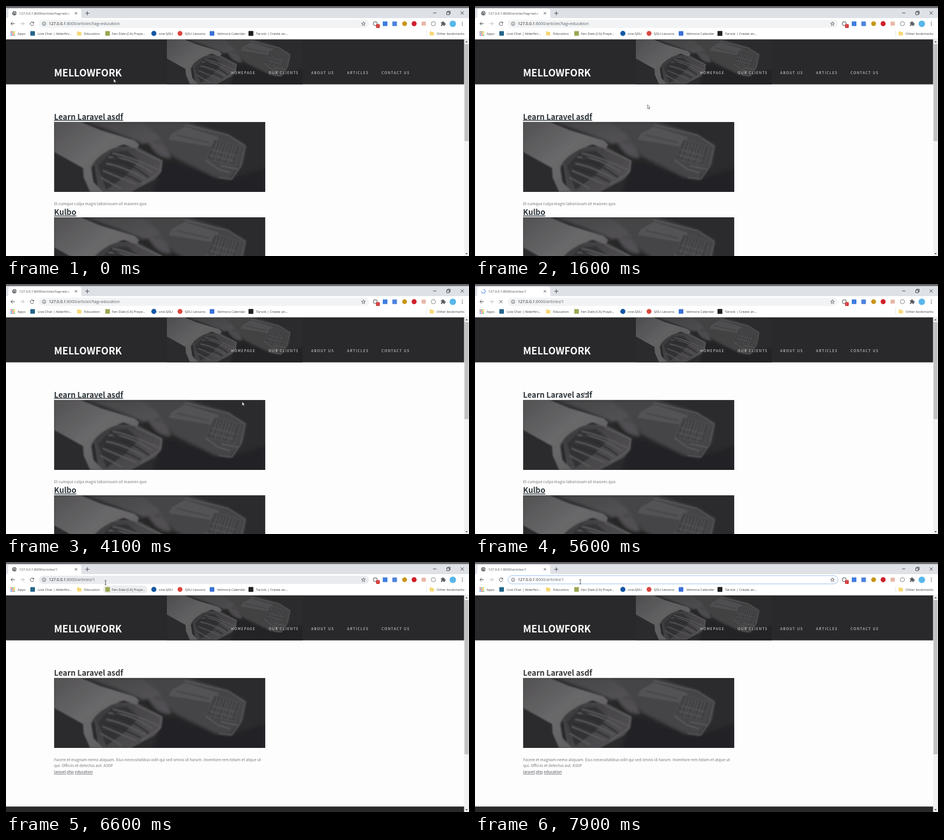
An HTML page that plays this animation: 800x433 px, repeating every 8000 ms.

```html
<!DOCTYPE html>
<html lang="en">
<head>
<meta charset="utf-8">
<title>Articles</title>
<style>
html, body { margin: 0; width: 100%; height: 100%; overflow: hidden; background: #fefdfe; }
svg { display: block; width: 800px; height: 433px; }
.ui { font-family: "Open Sans", "Noto Sans", sans-serif; font-size: 5.87px; fill: #3c4043; }
.page { font-family: "Noto Sans CJK JP", "Noto Sans CJK SC", "Noto Sans CJK", "Noto Sans", sans-serif; }
.title { font-size: 5.75px; fill: #45494d; }
.url { font-size: 6.98px; fill: #5f6368; }
.logo { font-size: 16.8px; font-weight: 700; fill: #fff; }
.nav { font-size: 5.97px; letter-spacing: 1.33px; fill: #e9e9e9; font-weight: 300; }
.head { font-size: 13.3px; font-weight: 600; fill: #2b3439; }
.copy { font-size: 6.69px; font-weight: 300; fill: #777; }
.tags { font-size: 6.62px; fill: #4c5257; }
.under { text-decoration: underline; }
.line { fill: none; stroke: #50545a; stroke-width: 1; }
</style>
</head>
<body>
<svg viewBox="0 0 800 433" xmlns="http://www.w3.org/2000/svg">
<defs>
  <linearGradient id="boot" x1="0" y1="0" x2="1" y2="1">
    <stop offset="0" stop-color="#525153"/><stop offset=".45" stop-color="#69686a"/><stop offset="1" stop-color="#5e5d5f"/>
  </linearGradient>
  <linearGradient id="far" x1="0" y1="0" x2="1" y2="1">
    <stop offset="0" stop-color="#434244"/><stop offset=".6" stop-color="#525153"/><stop offset="1" stop-color="#3b3a3c"/>
  </linearGradient>
  <linearGradient id="glass" x1="0" y1="0" x2="1" y2=".6">
    <stop offset="0" stop-color="#3a393b"/><stop offset="1" stop-color="#514f52"/>
  </linearGradient>
  <linearGradient id="fade" gradientUnits="userSpaceOnUse" x1="102" x2="116">
    <stop offset="0" stop-color="#fff" stop-opacity="0"/><stop offset="1" stop-color="#fff"/>
  </linearGradient>
  <filter id="soft" x="-20%" y="-20%" width="140%" height="140%"><feGaussianBlur stdDeviation="2.4"/></filter>
  <filter id="fine"><feGaussianBlur stdDeviation=".9"/></filter>
  <clipPath id="crop"><rect width="364.8" height="121.3"/></clipPath>
  <g id="photo" clip-path="url(#crop)">
    <rect width="365" height="122" fill="#2b2a2c"/>
    <g filter="url(#soft)">
      <path d="M190 64L300 100L365 80V125H170Z" fill="#242325"/>
      <path d="M55 0H152L200 22L206 56L190 64L150 36L110 20Z" fill="url(#far)"/>
      <path d="M150 38Q156 60 192 70L238 74L202 52L178 34Z" fill="#272628"/>
      <path d="M162 34Q196 34 202 62Q178 64 162 34Z" fill="#514f52"/>
      <path d="M150 0H230L300 22L331 40L326 72L305 99L278 96L206 60L178 22Z" fill="#454446"/>
    </g>
    <g filter="url(#fine)" fill="none" stroke-linejoin="round">
      <path d="M204 21L226 9L284 27L272 42L199 30Z" fill="#535254" stroke="#5c5b5d"/>
      <path d="M212 23L268 36" stroke="#444345" stroke-width="2"/>
      <path d="M226 5L301 23L330 42L322 77L307 99L284 96" stroke="#5b5a5c" stroke-width="2"/>
      <path d="M277 30L322 42L312 75L262 64Z" fill="#414042" stroke="#555456"/>
      <path id="pins" stroke="#5c5b5d" stroke-width="1.2"/>
      <path d="M262 66L284 82L304 88M288 76L318 82" stroke="#646365" stroke-width="1.5"/>
      <path d="M70 70L98 44L143 44L187 67L185 86L174 99L132 121H78Z" fill="url(#glass)" stroke="#59585a"/>
      <path d="M76 76L99 52L126 50L148 68L120 96L90 118Z" fill="#333234"/>
      <path d="M94 61Q130 60 170 88M101 54Q138 62 181 83M90 72Q120 77 158 99M84 84L141 108M80 96L116 116" stroke="#5b5a5c" stroke-width="2.4"/>
      <path d="M96 67Q130 69 164 96M87 79Q122 88 150 104M102 60L134 72" stroke="#2c2b2d" stroke-width="2.4"/>
      <path d="M142 48L186 68L182 88L150 108" stroke="#636264" stroke-width="1.5"/>
      <path d="M0 0H46L80 14L139 32L147 39L143 47L120 39L96 48L73 65L64 78L68 104L84 121H62L51 96L50 80L0 52Z" fill="url(#boot)"/>
      <path d="M65 80Q71 62 98 49" stroke="#403f41" stroke-width="2.5"/>
    </g>
  </g>
  <path id="folder" d="M0 1Q0 0 1 0H3L4 1H6.5Q7.5 1 7.5 2V6Q7.5 7 6.5 7H1Q0 7 0 6Z" fill="#f8d775"/>
</defs>

<rect width="800" height="433" fill="#fefdfe"/>
<g class="page">
  <rect y="57.5" width="792" height="78.2" fill="#29282a"/>
  <use href="#photo" transform="translate(278 57.5) scale(.644)"/>
  <rect x="278" y="57.5" width="235" height="78.2" fill="#29282a" opacity=".12"/>
  <text class="logo" x="83" y="122.2">MELLOWFORK</text>
  <g class="nav">
    <text x="389" y="118.3">HOMEPAGE</text><text x="454" y="118.3">OUR CLIENTS</text>
    <text x="527.5" y="118.3">ABOUT US</text><text x="589.5" y="118.3">ARTICLES</text>
    <text x="649" y="118.3">CONTACT US</text>
  </g>
  <text id="lead" class="head" x="83" y="196.5">Learn Laravel asdf</text>
  <use href="#photo" x="83.1" y="200.8"/>
  <g id="list">
    <text class="copy" x="83" y="345.2">Et cumque culpa magni laboriosam sit maiores quo.</text>
    <text class="head under" x="83" y="362">Kulbo</text>
    <use href="#photo" x="83.1" y="366"/>
  </g>
  <g id="article">
    <text class="copy" x="83" y="345.2">Facere et magnam nemo aliquam. Eius necessitatibus odit qui sed omnis id harum. Inventore rem totam et atque ut</text>
    <text class="copy" x="83" y="354.6">qui. Officiis et delectus aut. ASDF</text>
    <g class="tags under">
      <text x="83" y="366.3">laravel</text><text x="105" y="366.3">php</text><text x="119" y="366.3">education</text>
    </g>
    <rect y="423.5" width="792" height="10" fill="#29282a"/>
  </g>
</g>

<rect x="791.5" y="57.5" width="8.5" height="376" fill="#f1f1f1"/>
<rect id="thumb" x="792.3" y="66" width="7" fill="#c1c1c1"/>
<path d="M793.8 63L795.8 60.5L797.8 63Z" fill="#505050"/>
<path d="M793.8 428L795.8 430.5L797.8 428Z" fill="#505050"/>

<g class="ui">
  <rect width="800" height="22" fill="#dee1e6"/>
  <rect width="800" height="3.5" fill="#646469"/>
  <path d="M0 21.5Q4 21.5 4 17.5V8.5Q4 4.5 8 4.5H126Q130 4.5 130 8.5V17.5Q130 21.5 134 21.5Z" fill="#fff"/>
  <rect y="21" width="800" height="36.5" fill="#fff"/>
  <rect y="56.8" width="800" height=".7" fill="#dcdde0"/>
  <g id="globe">
    <circle cx="14.5" cy="12.6" r="3.7" fill="#54585d"/>
    <path d="M11.8 11.4L14 12.4L13.4 14.6M14.8 9.8L14.6 11.2L17.3 12.2L16.2 14.6" fill="none" stroke="#fff" stroke-width=".9"/>
  </g>
  <path id="spin" d="M14.5 9.2A3.4 3.4 0 1 1 11.1 12.6" fill="none" stroke="#4285f4" stroke-width="1"/>
  <text id="title" class="title" x="23" y="14.8"></text>
  <rect x="102" y="7" width="15" height="12" fill="url(#fade)"/>
  <path class="line" d="M119 10.7L122.8 14.5M122.8 10.7L119 14.5M137 12.6H144M140.5 9.1V16.1"/>
  <path d="M738 12H743.5M761.5 10.5H766V15H761.5ZM763 10.5V9H767.5V13.5H766M785.5 9.3L791 14.8M791 9.3L785.5 14.8" fill="none" stroke="#26282b" stroke-width=".8"/>

  <path class="line" d="M15 30.6H8.5M11.5 27.5L8.4 30.6L11.5 33.7"/>
  <path class="line" d="M25 30.6H31.5M28.5 27.5L31.6 30.6L28.5 33.7" style="stroke:#bbbdc0"/>
  <g id="reload"><path class="line" d="M47.6 29A3.1 3.1 0 1 0 48 31.6"/><path d="M48.4 26.9V30H45.3Z" fill="#50545a"/></g>
  <path id="stop" class="line" d="M42 27.8L47.6 33.4M47.6 27.8L42 33.4"/>
  <rect id="omni" x="56.8" y="23.7" width="570.5" height="14.2" rx="7.1"/>
  <circle class="line" cx="65.8" cy="30.7" r="3" style="stroke-width:.8"/>
  <path d="M65.8 30.2V32.5M65.8 28.8V29.5" stroke="#50545a" stroke-width=".8"/>
  <rect id="pick" x="74" y="26.3" width="78" height="9.2" fill="#a8c9f8"/>
  <text class="url" x="74" y="33.1"><tspan fill="#202124">127.0.0.1</tspan><tspan id="path"></tspan></text>
  <path class="line" d="M617.7 27.4L618.6 29.7L621 29.8L619.1 31.4L619.8 33.8L617.7 32.5L615.6 33.8L616.3 31.4L614.4 29.8L616.8 29.7Z" style="stroke-width:.8"/>

  <circle cx="638" cy="30.5" r="3.3" fill="none" stroke="#85888c" stroke-width="1.4"/>
  <rect x="639.5" y="31.5" width="6.2" height="6.5" rx="1" fill="#d02a2a"/>
  <text x="641.2" y="36.7" style="font-size:5px;fill:#fff">1</text>
  <rect x="651" y="26.7" width="8" height="8" fill="#3e7de0"/>
  <rect x="667.5" y="26.7" width="8" height="8" rx="1" fill="#4d83dc"/>
  <circle cx="688.7" cy="30.6" r="4.2" fill="#c79518"/>
  <circle cx="705.2" cy="30.6" r="4.3" fill="#cf1f2a"/>
  <rect x="718" y="27" width="7.5" height="7" rx="1" fill="#e7b8a8"/>
  <circle cx="738.5" cy="30.6" r="3.7" fill="none" stroke="#777b80" stroke-width=".9"/>
  <path d="M751.5 28.2H753.7Q753.4 26.4 755 26.4T756.3 28.2H758V30Q759.8 29.8 759.8 31.2T758 32.4V34.5H755.9Q755.8 32.8 754.8 32.8T753.6 34.5H751.5V32.4Q753 32.2 753 31.2T751.5 30Z" fill="#595d62"/>
  <circle cx="772" cy="30.8" r="5.6" fill="#58b6ea"/>
  <g fill="#50545a"><circle cx="788.5" cy="27.8" r=".8"/><circle cx="788.5" cy="30.6" r=".8"/><circle cx="788.5" cy="33.4" r=".8"/></g>

  <rect id="hover" x="167.5" y="40.5" width="77" height="14" rx="7" fill="#eceef0"/>
  <g id="apps"></g>
  <rect x="42" y="43.5" width="8" height="8" rx="1" fill="#24658b"/>
  <use href="#folder" x="122.8" y="44"/>
  <rect x="171.5" y="43.5" width="8" height="8" fill="#9aa651"/>
  <circle cx="255.5" cy="47.5" r="4.4" fill="#1657a5"/>
  <circle cx="300.7" cy="47.5" r="4.2" fill="#d9473e"/>
  <rect x="352" y="43.5" width="8" height="8" rx="1" fill="#3a70d8"/>
  <rect x="419" y="43.3" width="8.4" height="8.4" rx="1" fill="#202020"/>
  <rect x="726" y="42.5" width=".6" height="10" fill="#d5d7da"/>
  <use href="#folder" x="732" y="44"/>
  <g id="marks"></g>
</g>

<g id="mouse" stroke-linejoin="round">
  <path id="arrow" d="M0 0V6.7L1.6 5.3L2.7 7.7L3.7 7.2L2.6 4.9H4.7Z" fill="#fff" stroke="#222" stroke-width=".55"/>
  <path id="hand" d="M-.7 0Q0-.8.7 0V2.6L3.4 3.3V5.6L2.6 7.6H-.8L-2.6 4.7L-2 4L-.7 5Z" fill="#fff" stroke="#222" stroke-width=".55"/>
  <path id="beam" d="M-1.4 0H1.4M0 0V7.4M-1.4 7.4H1.4" fill="none" stroke="#222" stroke-width=".7"/>
</g>
</svg>
<script>
const $ = id => document.getElementById(id);
const LOOP = 8000, CLICK = 5300, LOADED = 5700, FOCUS = 6700, UNPICK = 7100;

// time, x, y
const track = [
  [0, 186, 126], [900, 287, 167], [1200, 298, 171], [1600, 298, 171],
  [2300, 280, 171], [3200, 280, 171], [4000, 408, 204], [4300, 408, 204],
  [5000, 191, 189], [5700, 189, 188], [5900, 190, 176], [6500, 174, 42],
  [6600, 172, 32], [7200, 176, 31], [7900, 182, 30.5]
];

const bookmarks = [
  [20, "Apps"], [55, "Live Chat | Alderfini..."], [135, "Education"],
  [183, "Fen Dale (CA) Praye..."], [264, "one.SJSU"], [309, "SJSU Lessons"],
  [365, "Velmora Calendar"], [432, "Tarvok | Create an..."], [744, "Other bookmarks"]
];
$("marks").innerHTML = bookmarks.map(([x, s]) => `<text x="${x}" y="49.7">${s}</text>`).join("");

const hues = ["#ea4335", "#34a853", "#fbbc05", "#4285f4"];
$("apps").innerHTML = Array.from({ length: 9 }, (_, i) =>
  `<rect x="${8 + i % 3 * 2.8}" y="${44 + Math.floor(i / 3) * 2.8}" width="1.9" height="1.9" fill="${hues[(i * 5 + (i > 4)) % 4]}"/>`).join("");

$("pins").setAttribute("d", Array.from({ length: 7 }, (_, i) =>
  `M${282 + i * 5.5} ${34 + i * 1.3}l-10 ${28 + i % 2 * 4}`).join("") + "M272 48l42 11M268 57l42 11");

function mouseAt(t) {
  const i = track.findIndex(k => k[0] > t);
  if (i < 0) return track[track.length - 1].slice(1);
  const a = track[i - 1], b = track[i];
  const u = (t - a[0]) / (b[0] - a[0]), e = u * u * (3 - 2 * u);
  return [a[1] + (b[1] - a[1]) * e, a[2] + (b[2] - a[2]) * e];
}

const show = (id, on) => $(id).setAttribute("visibility", on ? "visible" : "hidden");

function draw(t) {
  const [x, y] = mouseAt(t);
  const clicked = t >= CLICK, loaded = t >= LOADED, loading = clicked && !loaded;
  const focus = t >= FOCUS;
  const onLead = x > 83 && x < 203 && y > 182 && y < 200;
  const onBar = y < 38;
  const path = clicked ? "/articles/1" : "/articles?tag=education";

  $("title").textContent = "127.0.0.1:8000" + (clicked ? path : "/articles?tag=educ");
  $("path").textContent = ":8000" + path;
  $("lead").setAttribute("class", onLead || loaded ? "head" : "head under");
  $("lead").style.fill = loaded ? "#363638" : "";
  $("thumb").setAttribute("height", loaded ? 267 : 168);

  show("list", !loaded);
  show("article", loaded);
  show("globe", !loading);
  show("spin", loading);
  $("spin").setAttribute("transform", `rotate(${(t - 5600) * .36} 14.5 12.6)`);
  show("reload", !loading);
  show("stop", loading);
  show("pick", focus && t < UNPICK);
  show("hover", t >= 6400 && t < 6700);

  $("omni").setAttribute("fill", focus ? "#fff" : onBar ? "#e9ebee" : "#f1f3f4");
  $("omni").setAttribute("stroke", focus ? "#9fc3ee" : "none");

  const beam = onBar || (loaded && onLead);
  const hand = onLead && !loaded;
  show("beam", beam);
  show("hand", hand);
  show("arrow", !beam && !hand);
  $("mouse").setAttribute("transform", `translate(${x.toFixed(1)} ${y.toFixed(1)})`);
}

function tick() {
  draw(Math.floor(performance.now() % LOOP / 100) * 100);
  requestAnimationFrame(tick);
}
tick();
</script>
</body>
</html>
```
